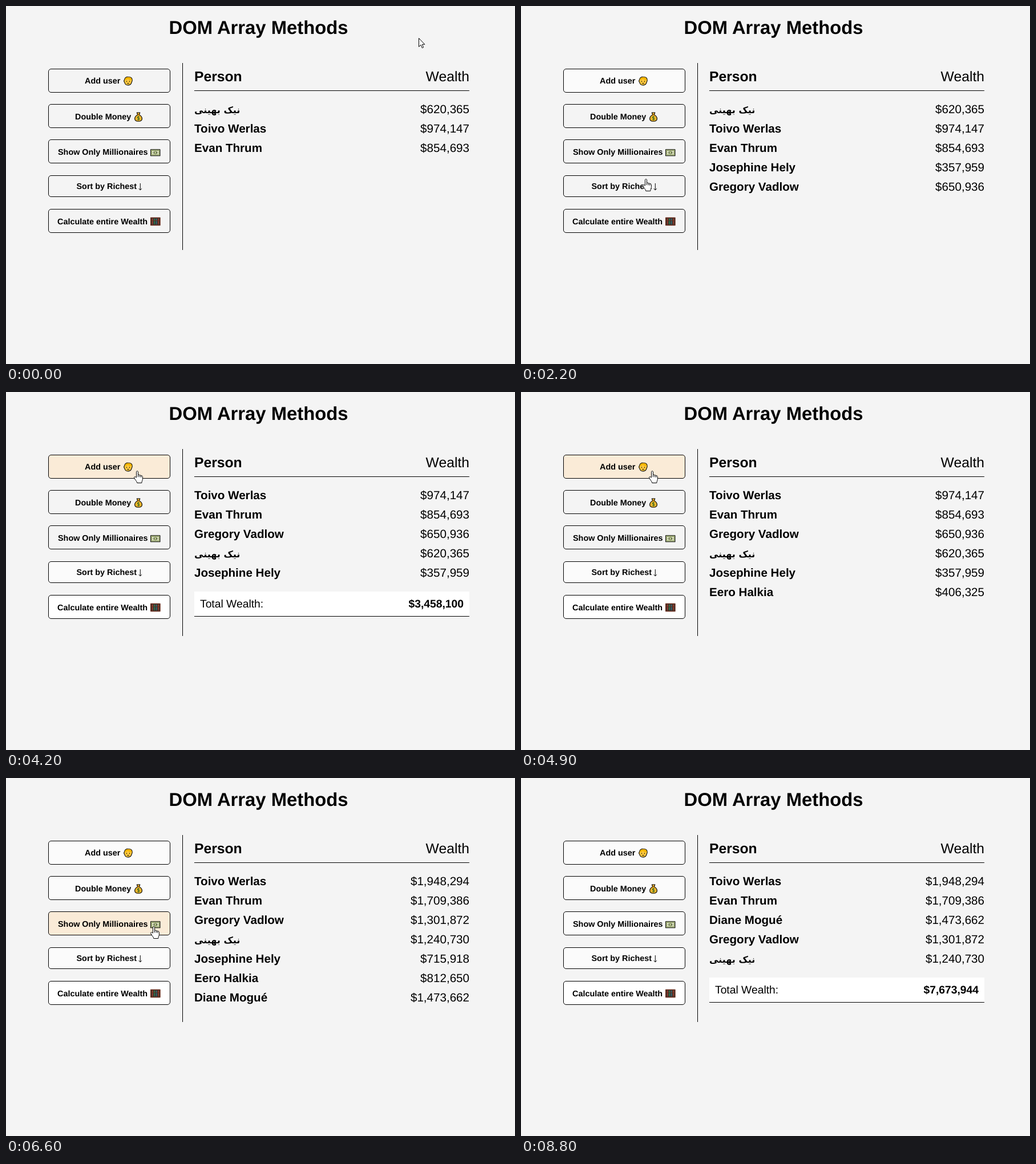
Animation of 892x628 px, one loop 9400 ms. Source, as an HTML page:

```html
<!DOCTYPE html>
<html lang="en">
<head>
<meta charset="utf-8">
<title>DOM Array Methods</title>
<style>
  html, body { margin: 0; width: 100%; height: 100%; overflow: hidden; background: #f4f4f4; }
  svg { display: block; }
  text { font-family: "Liberation Sans", Arial, sans-serif; fill: #000; text-rendering: geometricPrecision; white-space: pre; }
  .bold { font-weight: 700; }
  .end { text-anchor: end; }
  .rtl { font-family: "DejaVu Sans", sans-serif; }
  .rule { stroke: #000; shape-rendering: crispEdges; }
</style>
</head>
<body>
<svg id="stage" width="892" height="628" viewBox="0 0 892 628">
  <text class="bold" x="285.5" y="49" font-size="32.8">DOM Array Methods</text>
  <g id="buttons"></g>

  <g id="icons" stroke="#000" stroke-width="1.1" stroke-linejoin="round">
    <g transform="translate(206 123.5)">
      <path d="M1.6 6C2 2.2 5 .7 8 .7C12 .7 15.2 2.5 15.2 6.5C15.2 8.3 14.8 9.5 14.2 10.2C13.6 13.5 11 15.4 8 15.4C4.8 15.4 2.2 13.3 1.8 10.2C.4 9.5 .4 7 1.6 6Z" fill="#ffc83d"/>
      <path d="M2 6.2C3 2.2 6 1.3 8.5 1.3C12 1.3 14.6 3 14.6 6.5C11 6.5 9 5.5 7.5 4.2C6 5.8 4 6.3 2 6.2Z" fill="#f2b400" stroke="none"/>
      <path d="M5.5 8v1.4M10.5 8v1.4M6.2 12.3h3.6" fill="none"/>
    </g>
    <g transform="translate(225 186)">
      <path d="M4.3 1L5.8 4.8C2.5 6.3 .7 9.3 .7 12C.7 14.8 2.7 16.2 7 16.2S13.4 14.8 13.4 12C13.4 9.3 11.6 6.3 8.3 4.8L9.8 1Z" fill="#f5b82e"/>
      <path d="M4.8 4.8H9.4" stroke="#7a4b00" stroke-width="1.4"/>
      <path d="M9 8.6C7.5 7.5 5.2 8 5.4 9.6C5.7 11.3 8.8 10.4 8.8 12.3C8.7 13.8 6.2 13.9 5 12.9M7.1 7V14.8" fill="none" stroke="#3c6b20"/>
    </g>
    <g transform="translate(253 250.5)">
      <path d="M.6 1.2H16.9V12.2H.6Z" fill="#c9d89a"/>
      <path d="M2.5 3H15V10.4H2.5Z" fill="#eef2d2" stroke="#66753e" stroke-width=".8"/>
      <path d="M6 4.2V9.2M11.5 4.2V9.2M4.2 6.7H5M12.6 6.7H13.5" stroke="#3c4a22" stroke-width=".9"/>
      <ellipse cx="8.75" cy="6.7" rx="1.7" ry="2.4" fill="#c9d89a" stroke="#3c4a22" stroke-width=".8"/>
    </g>
    <path d="M235.3 311V323M232.8 320.2L235.3 323L237.8 320.2" fill="none" stroke-width="1"/>
    <g transform="translate(253 370.5)">
      <path d="M.7 1H17V14H.7Z" fill="#33302c" stroke="#6b2f1f" stroke-width="1.4"/>
      <path d="M3.7 2.5V12.5M14 2.5V12.5" stroke="#c2402c" stroke-width="1.8" stroke-dasharray="2.2 .7"/>
      <path d="M7.1 2.5V12.5" stroke="#2f8f5b" stroke-width="1.8" stroke-dasharray="2.2 .7"/>
      <path d="M10.5 2.5V12.5" stroke="#3a7f8f" stroke-width="1.8" stroke-dasharray="2.2 .7"/>
      <path d="M1 5.6H17" stroke="#6b2f1f" stroke-width=".9"/>
    </g>
  </g>

  <path class="rule" d="M309.5 100V428M330 148.5H812"/>
  <text class="bold" x="330" y="132" font-size="24.7">Person</text>
  <text class="end" x="812" y="132" font-size="24.7">Wealth</text>
  <g id="rows" font-size="20.6"></g>

  <g id="total" font-size="19.3">
    <path d="M330 350H812V394H330Z" fill="#fff"/>
    <path class="rule" d="M330 393.5H812"/>
    <text x="340" y="378">Total Wealth:</text>
    <text id="sum" class="bold end" x="802" y="378"></text>
  </g>

  <g id="cursor" fill="#fff" stroke="#000" stroke-linejoin="round">
    <path id="arrow" d="M.5 .5V15.5L4 12.2L6.3 17.6L8.6 16.6L6.3 11.3H10.8Z"/>
    <g id="hand">
      <path d="M4.5 12V2.2C4.5 .2 7.5 .2 7.5 2.2V7.6C8 6.8 10 6.9 10.3 8.2C11 7.5 12.6 7.8 12.8 9C13.6 8.5 15.4 9 15.4 10.6V14.5C15.4 17 13.8 18.5 13.8 21.5H5.8C5.6 19 3.5 17.5 2 15L.7 12.6C0 11 2 10 3.2 11.2Z"/>
      <path d="M7.5 7.6V11.2M10.3 8.2V11.4M12.8 9V11.8" fill="none"/>
    </g>
  </g>
</svg>

<script>
const LOOP = 9400, STEP = 100;
const byId = id => document.getElementById(id);

function add(parent, tag, attrs, content = '') {
  const node = document.createElementNS('http://www.w3.org/2000/svg', tag);
  for (const key in attrs) node.setAttribute(key, attrs[key]);
  node.textContent = content;
  return parent.appendChild(node);
}

const people = {
  nik: ['نیک بهینی', 620365],
  toivo: ['Toivo Werlas', 974147],
  evan: ['Evan Thrum', 854693],
  josephine: ['Josephine Hely', 357959],
  gregory: ['Gregory Vadlow', 650936],
  eero: ['Eero Halkia', 406325],
  diane: ['Diane Mogué', 736831]
};

// start time, people in order, wealth factor, total shown
const lists = [
  [0, 'nik toivo evan', 1],
  [800, 'nik toivo evan josephine', 1],
  [1400, 'nik toivo evan josephine gregory', 1],
  [2500, 'toivo evan gregory nik josephine', 1],
  [3300, 'toivo evan gregory nik josephine', 1, true],
  [4600, 'toivo evan gregory nik josephine eero', 1],
  [5200, 'toivo evan gregory nik josephine eero diane', 1],
  [5900, 'toivo evan gregory nik josephine eero diane', 2],
  [6700, 'toivo evan gregory nik diane', 2],
  [7500, 'toivo evan diane gregory nik', 2],
  [8500, 'toivo evan diane gregory nik', 2, true]
];

// label, text x, baseline, box top, box height, press times, fill once pressed
const buttons = [
  ['Add user', 138, 136, 110.5, 41, [500, 1100, 4200, 4900], '#fbfbfb'],
  ['Double Money', 121, 199, 172.5, 41, [5800], '#fbfbfb'],
  ['Show Only Millionaires', 91, 261, 234.5, 41, [6600], '#fbfbfb'],
  ['Sort by Richest', 123.5, 321, 297.5, 37, [2400, 7400], '#fbfbfb'],
  ['Calculate entire Wealth', 90, 383, 356.5, 41, [3200, 8400], '#fff']
].map(([label, x, baseline, y, height, presses, used]) => {
  const box = add(byId('buttons'), 'rect', { x: 74.5, y, width: 213, height, rx: 4.5, stroke: '#000' });
  add(byId('buttons'), 'text', { x, y: baseline, class: 'bold', 'font-size': 14.4 }, label);
  return { box, presses, used };
});

// time, x, y of the pointer
const path = [
  [0, 723, 56], [400, 221, 129], [1300, 221, 129], [1600, 220, 233], [1700, 220, 233],
  [2200, 213, 303], [2500, 213, 303], [2900, 217.5, 378], [3500, 217.5, 378],
  [4100, 224, 138], [5100, 224, 138], [5300, 243, 193], [5900, 243, 193],
  [6200, 253, 260], [6800, 253, 260], [7300, 214, 306], [7500, 214, 306],
  [7800, 213, 331], [8200, 210, 370], [8500, 210, 370], [8700, 826, 103], [LOOP, 826, 103]
];

const rows = Array.from({ length: 7 }, (_, i) => {
  const y = 188 + 34 * i;
  return {
    name: add(byId('rows'), 'text', { x: 330, y }),
    wealth: add(byId('rows'), 'text', { x: 812, y, class: 'end' })
  };
});

const money = n => '$' + n.toLocaleString('en-US');
const show = (node, visible) => node.setAttribute('display', visible ? 'inline' : 'none');

function drawList(t) {
  const [, order, factor, hasTotal] = lists.findLast(list => list[0] <= t);
  const shown = order.split(' ').map(key => people[key]);
  rows.forEach(({ name, wealth }, i) => {
    const [label, amount] = shown[i] || ['', 0];
    const rtl = label === people.nik[0];
    name.textContent = label;
    name.setAttribute('class', rtl ? 'bold rtl' : 'bold');
    name.setAttribute('font-size', rtl ? 16 : 20.6);
    wealth.textContent = label && money(amount * factor);
  });
  show(byId('total'), hasTotal);
  byId('sum').textContent = money(shown.reduce((sum, person) => sum + person[1] * factor, 0));
}

function drawButtons(t) {
  for (const { box, presses, used } of buttons) {
    const pressed = presses.some(at => t >= at && t < at + STEP);
    box.setAttribute('fill', pressed ? '#faebd7' : t >= presses[0] ? used : '#f4f4f4');
  }
}

function drawCursor(t) {
  const next = path.findIndex(key => key[0] > t);
  const [t0, x0, y0] = path[next - 1], [t1, x1, y1] = path[next];
  const k = (t - t0) / (t1 - t0);
  const x = x0 + (x1 - x0) * k, y = y0 + (y1 - y0) * k;
  byId('cursor').setAttribute('transform', `translate(${Math.round(x)} ${Math.round(y)})`);
  show(byId('cursor'), t < 8800);
  show(byId('arrow'), x > 287);
  show(byId('hand'), x <= 287);
}

function draw(ms) {
  const t = Math.floor(ms % LOOP / STEP) * STEP;
  drawList(t);
  drawButtons(t);
  drawCursor(t);
}

const start = performance.now();
function tick() {
  draw(performance.now() - start);
  requestAnimationFrame(tick);
}
tick();
</script>
</body>
</html>
```
